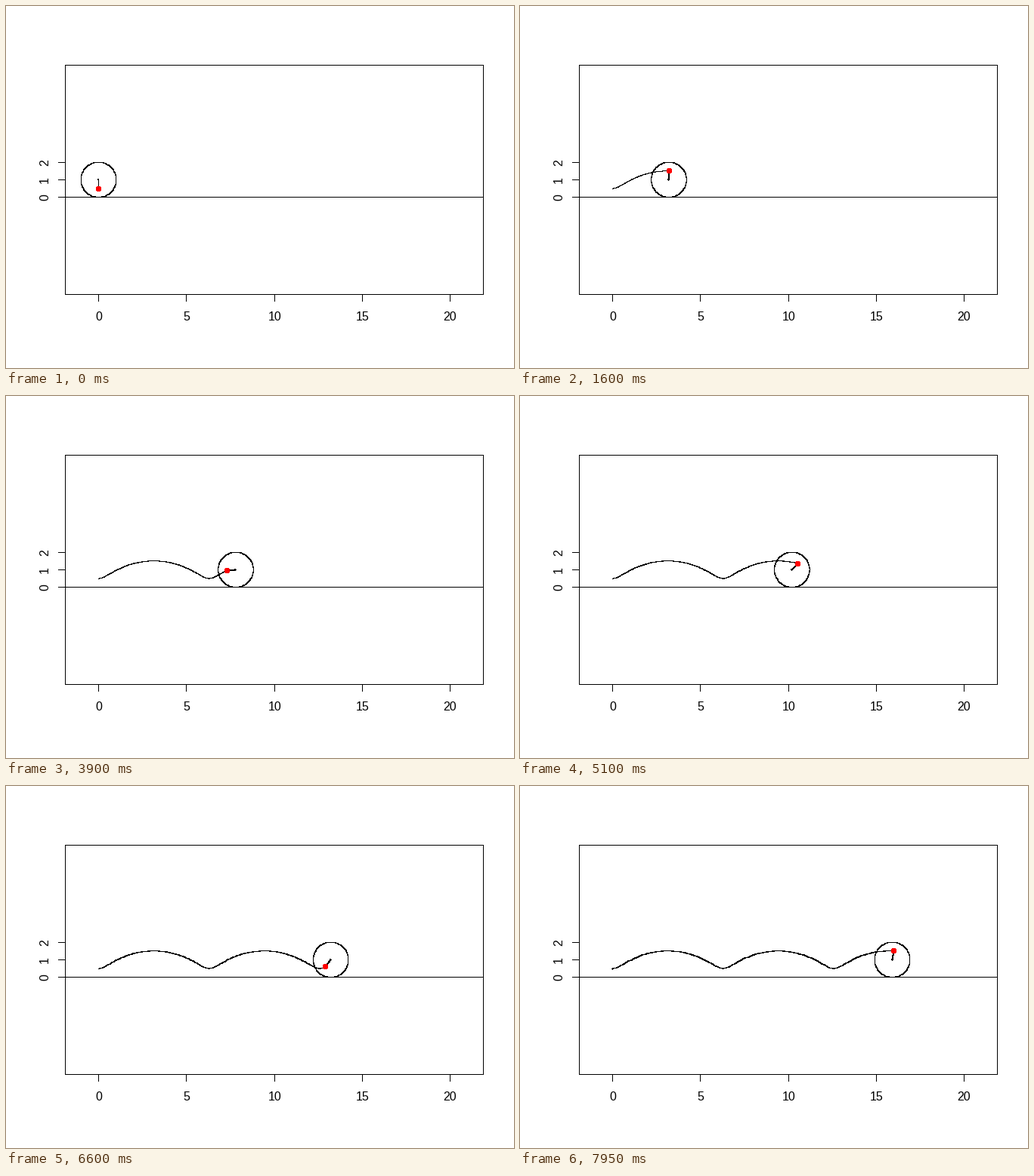
A matplotlib script that plays this animation: 672x480 px, repeating every 8 s.

```python
import numpy as np
import matplotlib.pyplot as plt
from matplotlib.animation import FuncAnimation
from matplotlib.patches import Circle, Rectangle

W, H, DPI = 672, 480, 96
FRAMES, INTERVAL = 160, 50
STEP = 0.1          # wheel angle per frame
ARM = 0.5           # distance of the tracing point from the hub

# Plot region in pixels, 22 units wide plus 4 % on each side
LEFT, RIGHT, TOP, BOTTOM = 78.72, 631.68, 78.72, 382.08
SCALE = (RIGHT - LEFT) / (22 * 1.08)
MID = (TOP + BOTTOM) / 2

plt.rcParams["font.family"] = "Liberation Sans"
plt.rcParams["path.simplify"] = False

fig = plt.figure(figsize=(W / DPI, H / DPI), dpi=DPI, facecolor="white")
ax = fig.add_axes([0, 0, 1, 1])
ax.set_xlim(0, W)
ax.set_ylim(H, 0)
ax.axis("off")


def px(x):
    """Data x to the centre of its pixel column."""
    return np.floor(LEFT + (np.asarray(x) + 1.88) * SCALE) + 0.5


def py(y):
    """Data y to the centre of its pixel row."""
    return np.floor(MID - (np.asarray(y) - 1) * SCALE) + 0.5


def stroke(x=(), y=(), z=2):
    line, = ax.plot(x, y, color="black", lw=72 / DPI, antialiased=False,
                    solid_capstyle="projecting", solid_joinstyle="miter",
                    snap=False, zorder=z)
    return line


def label(x, y, text, rotation=0):
    ax.text(x, y, text, fontsize=12, color="black", rotation=rotation,
            rotation_mode="anchor", ha="center", va="baseline")


# Frame, ground and axes
x0, x1, y0, y1 = 78.5, 631.5, 78.5, 382.5
stroke([x0, x1, x1, x0, x0], [y0, y0, y1, y1, y0])
stroke([x0, x1], [py(0)] * 2)
for v in range(0, 21, 5):
    stroke([px(v)] * 2, [y1, y1 + 9])
    label(px(v), 417, str(v))
for v in range(3):
    stroke([x0 - 9, x0], [py(v)] * 2)
    label(56, py(v), str(v), 90)

# Moving parts
rim, spoke, trail = stroke(), stroke(), stroke()
hub = Rectangle((0, 0), 2, 2, fc="black", ec="none", antialiased=False,
                snap=False, zorder=3)
pen = Circle((0, 0), 3.5, fc="red", ec="none", antialiased=False,
             snap=False, zorder=4)
ax.add_patch(hub)
ax.add_patch(pen)

turn = np.linspace(0, 2 * np.pi, 101)


def trochoid(t):
    return px(t - ARM * np.sin(t)), py(1 - ARM * np.cos(t))


def update(i):
    t = i * STEP
    cx, cy = px(t), py(1)
    tx, ty = trochoid(t)
    rim.set_data(px(t + np.cos(turn)), py(1 + np.sin(turn)))
    spoke.set_data([cx, tx], [cy, ty])
    trail.set_data(*trochoid(np.linspace(0, t, 200)))
    hub.set_xy((cx - 1.5, cy - 1.5))
    pen.set_center((tx, ty))
    return rim, spoke, trail, hub, pen


anim = FuncAnimation(fig, update, frames=FRAMES, interval=INTERVAL,
                     init_func=lambda: update(0), repeat=True)
plt.show()
```
